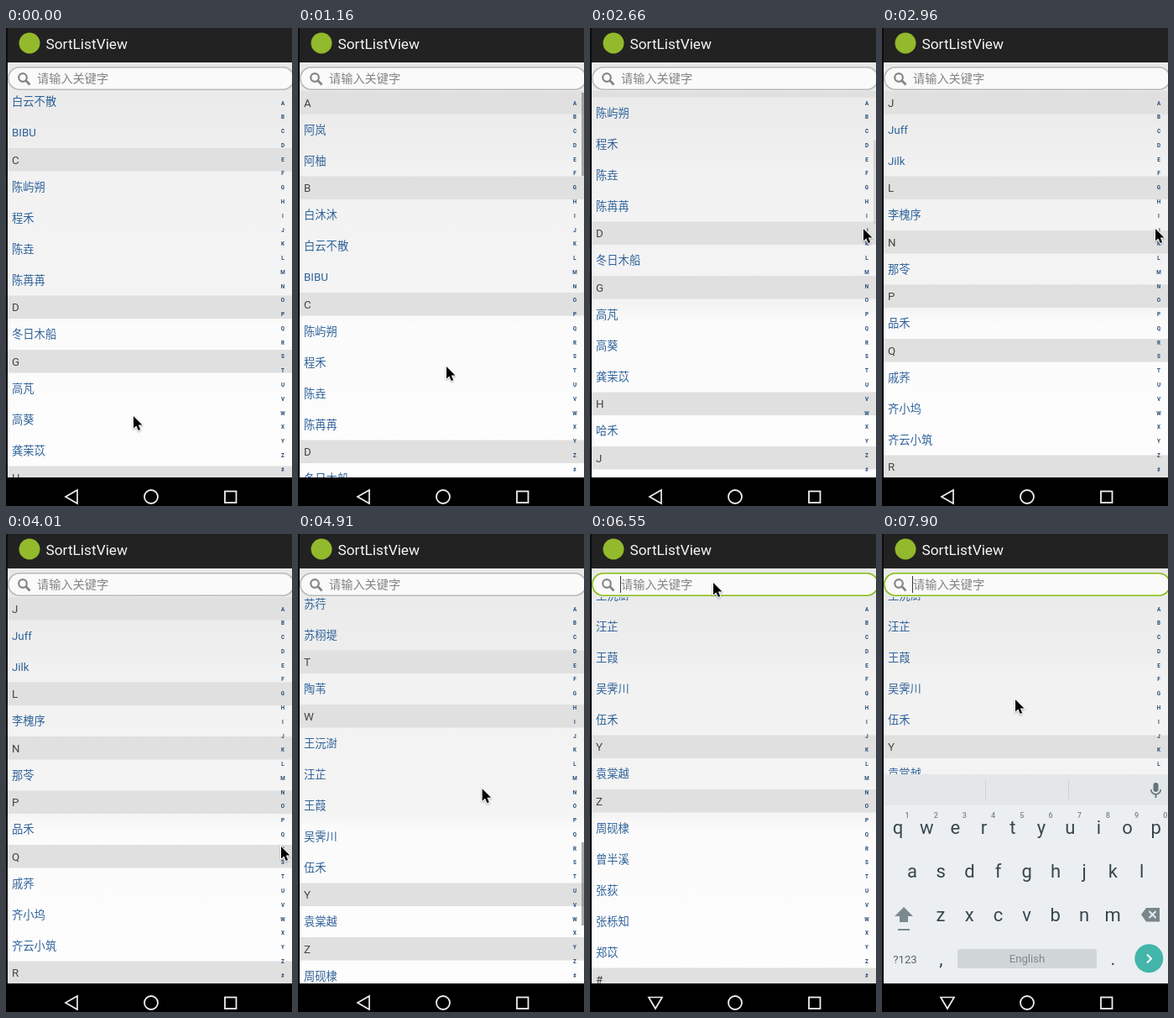
Write an HTML page with a canvas that moves like this. It is 341 px wide and 569 px high and loops after 8 s.

```html
<!DOCTYPE html>
<html lang="zh-CN">
<head>
<meta charset="utf-8">
<title>SortListView</title>
<style>
html, body { margin: 0; width: 100%; height: 100%; overflow: hidden; background: #000; }
canvas { display: block; width: 341px; height: 569px; }
</style>
</head>
<body>
<canvas id="stage"></canvas>
<script>
const W = 341, H = 569, LOOP = 8000;
const TOP = 75, BOTTOM = 535, HEAD_H = 27.5, ROW_H = 37, MAX_SCROLL = 1624;
const FONT = 'Roboto, "Noto Sans CJK SC", "Noto Sans CJK", sans-serif';

const canvas = document.getElementById('stage');
const ctx = canvas.getContext('2d');
const dpr = window.devicePixelRatio || 1;
canvas.width = W * dpr;
canvas.height = H * dpr;

const sections = {
  A: '阿岚 阿柚',
  B: '白沐沐 白云不散 BIBU',
  C: '陈屿朔 程禾 陈垚 陈苒苒',
  D: '冬日木船',
  G: '高芃 高葵 龚茉苡',
  H: '哈禾',
  J: 'Juff Jilk',
  L: '李槐序',
  N: '那苓',
  P: '品禾',
  Q: '戚荞 齐小坞 齐云小筑',
  R: '阮昨夕',
  S: '沙棠野 宋秋圃 宋茗 苏荇 苏栩堤',
  T: '陶苇',
  W: '王沅澍 汪芷 王葭 吴霁川 伍禾',
  Y: '袁棠越',
  Z: '周砚棣 曾半溪 张荻 张栎知 郑苡',
  '#': '~秋先生 #蒋苇杭 $260418573$'
};

// Flat list of rows with their offsets
const rows = [];
const sectionTop = {};
let offset = 0;
for (const [letter, names] of Object.entries(sections)) {
  sectionTop[letter] = offset;
  rows.push({ text: letter, y: offset, h: HEAD_H, head: true });
  offset += HEAD_H;
  for (const text of names.split(' ')) {
    rows.push({ text, y: offset, h: ROW_H });
    offset += ROW_H;
  }
}

// Keys are [time, ...values]; two keys at one time make a jump
const scrollKeys = [
  [0, 172], [300, 172], [450, 118], [600, 62], [750, 22], [900, 0],
  [1310, 0], [1460, 40], [1760, 165], [1960, 225], [2210, 260],
  [2810, 260], [2810, sectionTop.J],
  [4310, sectionTop.J], [4310, sectionTop.R],
  [4610, sectionTop.R], [4910, 1330], [5210, 1590], [5360, MAX_SCROLL],
  [5510, MAX_SCROLL], [5810, 1545], [5960, 1506]
];
const pointerKeys = [
  [0, 152, 462], [300, 160, 300], [750, 177, 403],
  [1310, 177, 403], [1760, 185, 260], [2060, 240, 245], [2510, 326, 239],
  [3110, 326, 239], [4010, 328, 372],
  [4310, 328, 372], [4610, 225, 400], [5060, 217, 255],
  [5510, 217, 255], [5960, 206, 373], [6400, 147, 58],
  [7900, 147, 58], [7900, 159, 197]
];
const barKeys = [
  [0, 0], [150, 0], [300, 1], [1160, 1], [1460, 1], [2510, 1], [2760, 0],
  [4460, 0], [4760, 1], [6200, 1], [6400, 0]
];
const keyboardKeys = [[0, 0], [6550, 0], [7000, 1]];

function valueAt(keys, t) {
  let i = keys.length - 1;
  while (i > 0 && keys[i][0] > t) i--;
  const a = keys[i], b = keys[i + 1] || a;
  const p = b === a ? 0 : (t - a[0]) / (b[0] - a[0]);
  return a.slice(1).map((v, n) => v + (b[n + 1] - v) * p);
}

// The screen refreshes about every 150 ms
function snap(t) {
  const base = t >= 6400 ? 6400 : t >= 1160 ? 1160 : 0;
  return base + Math.floor((t - base) / 150) * 150;
}

function rect(x, y, w, h, color) {
  ctx.fillStyle = color;
  ctx.fillRect(x, y, w, h);
}

function label(text, x, y, size, color, align = 'left', weight = 400) {
  ctx.font = `${weight} ${size}px ${FONT}`;
  ctx.textAlign = align;
  ctx.fillStyle = color;
  ctx.fillText(text, x, y);
}

function shape(points, closed = true) {
  ctx.beginPath();
  points.forEach(([x, y]) => ctx.lineTo(x, y));
  if (closed) ctx.closePath();
}

function fill(color) {
  ctx.fillStyle = color;
  ctx.fill();
}

function stroke(color, width) {
  ctx.strokeStyle = color;
  ctx.lineWidth = width;
  ctx.stroke();
}

function circle(x, y, r) {
  ctx.beginPath();
  ctx.arc(x, y, r, 0, Math.PI * 2);
}

function roundBox(x, y, w, h, r) {
  ctx.beginPath();
  ctx.roundRect(x, y, w, h, r);
}

function drawBackground() {
  rect(0, 0, W, H, '#000');
  const g = ctx.createLinearGradient(0, 41, 0, BOTTOM);
  const stops = [[41, '#e9e9e9'], [140, '#eeeeee'], [170, '#f2f2f2'],
    [332, '#f4f4f4'], [352, '#fbfbfb'], [BOTTOM, '#fdfdfd']];
  for (const [y, color] of stops) g.addColorStop((y - 41) / (BOTTOM - 41), color);
  rect(2, 41, W - 2, BOTTOM - 41, g);
}

function drawList(scroll, barAlpha) {
  ctx.save();
  ctx.beginPath();
  ctx.rect(2, TOP, W - 2, BOTTOM - TOP);
  ctx.clip();
  for (const row of rows) {
    const y = TOP + row.y - scroll;
    if (y + row.h < TOP || y > BOTTOM) continue;
    if (row.head) rect(2, y, W - 2, row.h, '#e0e0e0');
    label(row.text, 7, y + row.h / 2 + 4.9, 13.3, row.head ? '#454545' : '#2f6299');
  }
  [...'ABCDEFGHIJKLMNOPQRSTUVWXYZ#'].forEach((c, i) =>
    label(c, 330, 91.6 + i * 16.77, 6.3, '#244a73', 'center', 700));
  if (barAlpha > 0) {
    const y = 77 + scroll / MAX_SCROLL * 354;
    rect(338, y, 3, 99, `rgba(110,110,110,${0.55 * barAlpha})`);
  }
  ctx.restore();
}

function drawTitle() {
  rect(0, 0, W, 41, '#222');
  rect(0, 0, 2, H, '#0c0c0c');
  circle(28, 18, 12.5);
  fill('#93b92c');
  label('SortListView', 47.5, 25.3, 17.3, '#f4f4f4');
}

function drawSearch(focused, caret) {
  roundBox(2.8, 46.8, 340.5, 26.4, 13.2);
  fill('#fafafa');
  stroke(focused ? '#84bd10' : '#b9b9b9', 1.6);
  circle(20, 59, 4.8);
  stroke('#858585', 2.2);
  shape([[23.6, 62.6], [28.5, 67.5]], false);
  stroke('#858585', 2.8);
  label('请输入关键字', 37, 65.4, 14.2, '#848484');
  if (caret) rect(36, 50, 1, 20, '#333');
}

function drawNav(keyboardOpen) {
  rect(0, BOTTOM, W, H - BOTTOM, '#000');
  shape(keyboardOpen
    ? [[70, 551.5], [86, 551.5], [78, 565]]
    : [[71, 558], [85, 550], [85, 566]]);
  stroke('#eee', 1.7);
  circle(173, 558, 8);
  stroke('#eee', 1.8);
  ctx.strokeRect(261, 551.5, 13.5, 13.5);
}

function drawMic() {
  roundBox(323.5, 296, 6, 11, 3);
  fill('#65757c');
  ctx.beginPath();
  ctx.arc(326.5, 304, 5.8, 0, Math.PI);
  stroke('#65757c', 1.6);
  rect(325.6, 309, 1.8, 5, '#65757c');
}

function drawKeyRow(keys, x, y) {
  [...keys].forEach((c, i) => label(c, x + i * 34.2, y, 22, '#37474f', 'center'));
}

function drawKeyboard(open) {
  if (open <= 0) return;
  ctx.save();
  ctx.beginPath();
  ctx.rect(2, TOP, W - 2, BOTTOM - TOP);
  ctx.clip();
  ctx.translate(0, (1 - open) * 249);

  rect(2, 286, W - 2, 249, '#eceff1');
  rect(2, 286, W - 2, 37, '#e3e7e9');
  rect(123, 293, 1, 23, '#cdd3d6');
  rect(222, 293, 1, 23, '#cdd3d6');
  drawMic();

  drawKeyRow('qwertyuiop', 19, 357);
  drawKeyRow('asdfghjkl', 36, 409);
  drawKeyRow('zxcvbnm', 70, 461);
  [...'1234567890'].forEach((c, i) =>
    label(c, 30 + i * 34.2, 338, 9, '#78868c', 'center', 500));

  shape([[26, 444], [37, 455], [31, 455], [31, 462], [21, 462], [21, 455], [15, 455]]);
  fill('#7b898f');
  rect(19, 470, 14, 2, '#7b898f');

  shape([[309, 453], [315, 445], [331, 445], [331, 461.5], [315, 461.5]]);
  fill('#78868c');
  for (const d of [-1, 1]) {
    shape([[318.5, 453 - 4 * d], [326.5, 453 + 4 * d]], false);
    stroke('#eceff1', 1.8);
  }

  label('?123', 27.5, 510.5, 13.2, '#54646b', 'center');
  label(',', 70.5, 513, 22, '#37474f', 'center');
  label('.', 275.5, 513, 22, '#37474f', 'center');
  roundBox(90, 494, 166, 23, 3);
  fill('#d0d5d7');
  label('English', 173, 510, 13.2, '#7d898e', 'center');

  circle(318.3, 505.3, 17);
  fill('#43b5aa');
  shape([[316, 500.5], [321, 505.5], [316, 510.5]], false);
  stroke('#fff', 2);
  ctx.restore();
}

function drawPointer(x, y) {
  ctx.save();
  ctx.translate(x, y);
  ctx.lineJoin = 'round';
  ctx.shadowColor = 'rgba(0,0,0,.3)';
  ctx.shadowBlur = 2 * dpr;
  ctx.shadowOffsetY = dpr;
  shape([[0, 0], [0, 14.5], [3.4, 11.4], [5.8, 17], [8.2, 16], [5.8, 10.5], [10.5, 10.5]]);
  stroke('#fff', 2);
  ctx.shadowColor = 'transparent';
  fill('#000');
  ctx.restore();
}

function draw(time) {
  const t = snap(time);
  const [scroll] = valueAt(scrollKeys, t);
  const [bar] = valueAt(barKeys, t);
  const [open] = valueAt(keyboardKeys, t);
  const [px, py] = valueAt(pointerKeys, t);
  const caret = (t >= 6550 && t < 7000) || t >= 7600;

  ctx.setTransform(dpr, 0, 0, dpr, 0, 0);
  drawBackground();
  drawList(scroll, bar);
  drawTitle();
  drawSearch(t >= 6400, caret);
  drawKeyboard(open);
  drawNav(t >= 6550);
  drawPointer(px, py);
}

const start = performance.now();
function tick() {
  draw((performance.now() - start) % LOOP);
  requestAnimationFrame(tick);
}
tick();
</script>
</body>
</html>
```
